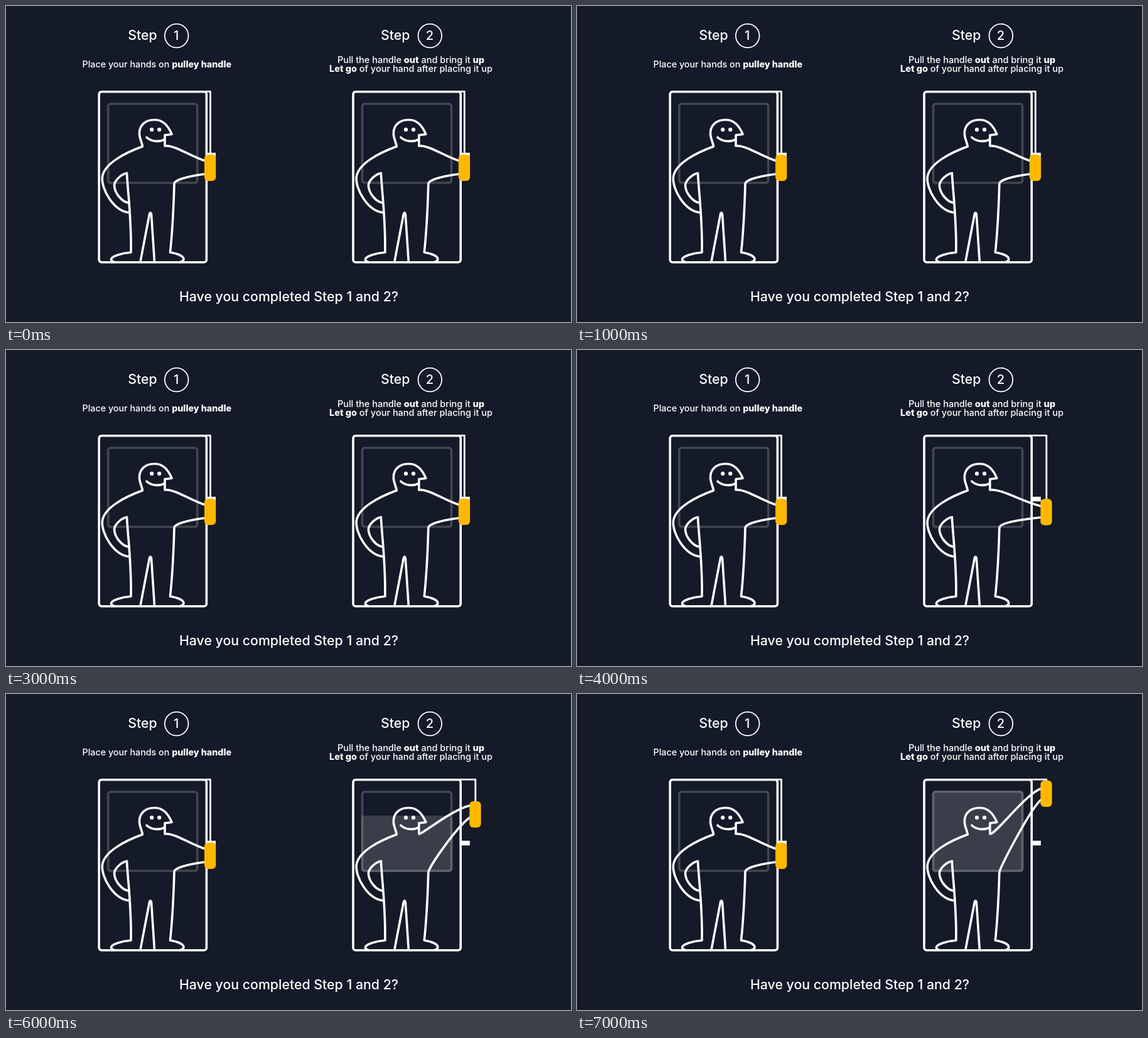
Animation, 900 px wide and 504 px high, one loop 8 s. Source, as an HTML page with a canvas:

```html
<!DOCTYPE html>
<html lang="en">
<head>
<meta charset="utf-8">
<title>Pulley steps</title>
<style>
  html, body { margin: 0; width: 100%; height: 100%; overflow: hidden; background: #141a28; }
  canvas { display: block; width: 900px; height: 504px; }
</style>
</head>
<body>
<canvas id="stage" width="900" height="504"></canvas>
<script>
const ctx = document.getElementById('stage').getContext('2d');
const LOOP = 8000, STEP = 1000;
const WHITE = '#fff', YELLOW = '#ffb800', BACK = '#141a28';

// Handle left and top, shade top, and the two arm curves from body to hand.
const REST = {
  x: 316, y: 237, shade: null,
  upper: 'M253 223C270 222 292 239 317 247',
  lower: 'M268 284C268 279 278 276 285 274S301 270 317 268'
};
const LIFT = [
  { x: 333.5, y: 237.5, shade: null,
    upper: 'M253 223C275 222 301 241 334 249',
    lower: 'M268 284C268 279 278 276 287 274S314 269 334 267' },
  { x: 333.5, y: 210, shade: 238,
    upper: 'M253 222C268 219 300 219 334 220',
    lower: 'M268 284C270 275 303 257 334 240' },
  { x: 333.5, y: 171, shade: 194,
    upper: 'M254 223C263 220 307 184 334 178',
    lower: 'M268 284C272 271 314 211 334 197' },
  { x: 333.5, y: 138, shade: 154,
    upper: 'M254 223C264 221 311 159 334 151',
    lower: 'M268 284C272 271 317 184 334 169' }
];

const BODY = new Path2D([
  'M253 223V206L264 204.500C258 190 250 181.500 237 181.500',
  'C222 181.500 212.500 190 212.500 203C212.500 211 216 216 217.500 224',
  'C190 234 157 251 153.500 272C151 292 172 328 197 329.500',
  'M196 314C185 313 173 299 172.500 286C173 279 182 269 192.500 266.500',
  'C194 297 200 340 199 393C185 394 168 399 167.500 404Q168 408 173 408.500',
  'M214 408L228.500 332Q230 327.500 231.500 332L236.500 408',
  'M268 284C267 320 265 360 261.500 393C274 395 283 399 283 404Q282 408 277 408.500',
  'M224 209.500C232 217 244 217 252.500 213'
].join(''));

function stroke(path, width = 3.6, color = WHITE) {
  ctx.lineWidth = width;
  ctx.strokeStyle = color;
  ctx.stroke(path);
}

function roundBox(x, y, w, h, r) {
  const path = new Path2D();
  path.roundRect(x, y, w, h, r);
  return path;
}

function dot(x, y, r) {
  const path = new Path2D();
  path.arc(x, y, r, 0, Math.PI * 2);
  return path;
}

function fill(path, color) {
  ctx.fillStyle = color;
  ctx.fill(path);
}

// Draws a centred line made of [text, weight] runs.
function textLine(runs, centre, baseline, size) {
  const setFont = weight => { ctx.font = `${weight} ${size}px Inter, sans-serif`; };
  const widths = runs.map(([text, weight]) => {
    setFont(weight);
    return ctx.measureText(text).width;
  });
  let x = centre - widths.reduce((a, b) => a + b, 0) / 2;
  ctx.fillStyle = WHITE;
  runs.forEach(([text, weight], i) => {
    setFont(weight);
    ctx.fillText(text, x, baseline);
    x += widths[i];
  });
}

function heading(label, wordX, circleX) {
  textLine([['Step', 500]], wordX, 54, 21.3);
  stroke(dot(circleX, 47.5, 18.8), 1.8);
  textLine([[label, 500]], circleX - 0.5, 54, 20);
}

function scene(left, pose) {
  ctx.save();
  ctx.translate(left, 0);
  stroke(roundBox(162.7, 156, 142, 126, 4), 3.7, '#424650');
  if (pose.shade !== null) {
    fill(roundBox(161, pose.shade, 145.5, 284 - pose.shade, 5), 'rgba(255,255,255,0.155)');
  }
  stroke(roundBox(148.2, 136.7, 171.2, 272, 4));

  const cordX = pose.x + 9.5;
  stroke(new Path2D(`M318 136.300H${cordX}V${pose.y + 3}`), 2.8);
  ctx.fillStyle = WHITE;
  ctx.fillRect(320, 234, 14, 7.5);

  stroke(BODY);
  stroke(new Path2D(pose.upper));
  stroke(new Path2D(pose.lower));
  fill(dot(232.2, 197.2, 3.1), WHITE);
  fill(dot(244.2, 197.2, 3.1), WHITE);
  fill(roundBox(pose.x, pose.y, 18.3, 42, 6), YELLOW);
  ctx.restore();
}

function draw(time) {
  const beat = Math.floor(time / STEP);
  ctx.fillStyle = BACK;
  ctx.fillRect(0, 0, 900, 504);

  heading('1', 217.5, 271.7);
  heading('2', 620.3, 675.3);
  textLine([['Place your hands on ', 500], ['pulley handle', 800]], 240.3, 98, 14.3);
  textLine([['Pull the handle ', 500], ['out', 800], [' and bring it ', 500], ['up', 800]], 645, 91, 14.5);
  textLine([['Let go', 800], [' of your hand after placing it up', 500]], 645, 105, 14.5);
  textLine([['Have you completed Step 1 and 2?', 500]], 450.5, 471, 21.3);

  scene(0, REST);
  scene(404.8, beat < 4 ? REST : LIFT[beat - 4]);
}

function tick() {
  draw(performance.now() % LOOP);
  requestAnimationFrame(tick);
}

ctx.lineCap = 'round';
ctx.lineJoin = 'round';
tick();
</script>
</body>
</html>
```
